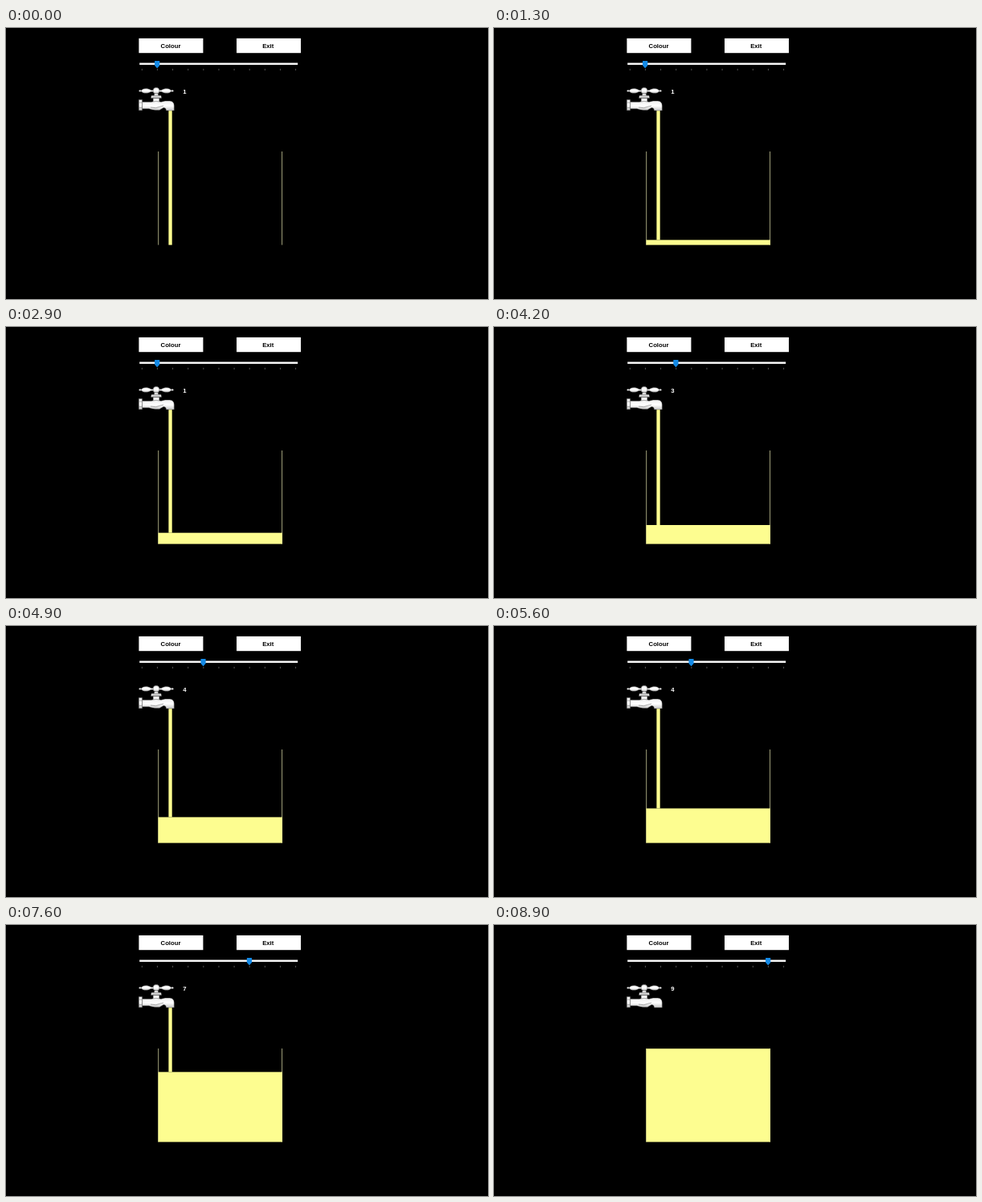
Recreate the animation shown at these times as an HTML page. Size 600 by 338 pixels, loop 9200 ms.

```html
<!DOCTYPE html>
<html lang="en">
<head>
<meta charset="utf-8">
<title>Filling tank</title>
<style>
  html, body { margin: 0; width: 100%; height: 100%; overflow: hidden; background: #000; }
  svg { display: block; width: 100%; height: 100%; }
  text { font: bold 7.7px "Liberation Sans", Arial, sans-serif; text-anchor: middle; }
</style>
</head>
<body>
<svg viewBox="0 0 600 338">
  <g fill="#fff">
    <rect x="165.4" y="12.9" width="80" height="18.3"/>
    <rect x="287" y="12.9" width="80" height="18.3"/>
  </g>
  <text x="205" y="24.6">Colour</text>
  <text x="326.2" y="24.6">Exit</text>

  <rect x="166.2" y="43.5" width="197" height="2.4" fill="#fff"/>
  <path id="ticks" stroke="#666" stroke-width=".8"/>
  <path id="thumb" fill="#148ae6" d="M-3.1 40.9H3.1V46.8L0 50.3L-3.1 46.8Z"/>
  <text id="label" x="222.3" y="81.8" fill="#fff"></text>

  <path d="M189.7 154V270.6M343.6 154V270.6" stroke="#b5b58b" stroke-width=".9"/>
  <g fill="#fdfd90">
    <rect id="stream" x="202.4" y="102" width="4.3"/>
    <rect id="water" x="189.5" width="154.4"/>
  </g>

  <defs>
    <linearGradient id="metal" x2="0" y2="1">
      <stop offset="0" stop-color="#eee"/>
      <stop offset=".5" stop-color="#fff"/>
      <stop offset="1" stop-color="#c8c8c8"/>
    </linearGradient>
    <g id="lever">
      <ellipse cx="167" cy="78.4" rx="1.5" ry="1.2"/>
      <path d="M168 78.4C170 74.8 176 74.6 180.5 77.4H184V79.4H180.5C176 82.2 170 82 168 78.4Z"/>
    </g>
  </defs>
  <g fill="url(#metal)" stroke="#444" stroke-width=".4">
    <use href="#lever"/>
    <use href="#lever" transform="matrix(-1 0 0 1 374 0)"/>
    <circle cx="187" cy="78.2" r="3.9"/>
    <path d="M184.8 82H189.2L189.8 84.5H184.2Z"/>
    <path d="M181 84.3H193L193.6 87.4H180.4Z"/>
    <path d="M183.2 87.6H190.8V92.5H183.2Z"/>
    <path d="M169.5 92.3H181Q187 90.4 193 92.3L198 91H204Q209.3 91.5 209.3 97V103H199.4Q199.4 99.2 196 99.4L191 102.4H186Q181 102.2 178 100.8H169.5Z"/>
    <path d="M165.3 89.4H169.6V102.8H165.3Z"/>
  </g>
  <path d="M165.6 93H169M165.6 99.4H169M180 99Q187 101 192 98L196 97M182 86H192" fill="none" stroke="#666" stroke-width=".5"/>
</svg>
<script>
const LOOP = 9200, FLOOR = 270.6, BRIM = 154.2, SPOUT = 102;
const OPENING_START = 3300, OPENING_EVERY = 785;
const el = id => document.getElementById(id);
const set = (id, name, value) => el(id).setAttribute(name, value);
const sliderX = value => 169.3 + 19.13 * value;

set("ticks", "d",
  Array.from({ length: 11 }, (_, i) => `M${sliderX(i)} 50.8V53`).join(""));

// The tap opens one notch at a steady pace after a first slow spell.
const tapSetting = t => 1 + Math.max(0, Math.floor((t - OPENING_START) / OPENING_EVERY) + 1);

// Steady inflow at first, then accelerating as the tap opens.
function surfaceAt(t) {
  const seconds = t / 1000;
  const opening = Math.max(0, seconds - 3);
  return Math.max(BRIM, FLOOR - 4.8 * seconds - 2.4 * opening ** 2);
}

function draw(now) {
  const t = Math.floor(now % LOOP / 100) * 100;
  const surface = surfaceAt(t);
  const value = tapSetting(t);

  set("water", "y", surface);
  set("water", "height", FLOOR - surface);
  set("stream", "height", surface > BRIM ? surface - SPOUT : 0);
  set("thumb", "transform", `translate(${sliderX(value) - 0.3} 0)`);
  el("label").textContent = value;
}

function tick() {
  draw(performance.now());
  requestAnimationFrame(tick);
}
tick();
</script>
</body>
</html>
```
